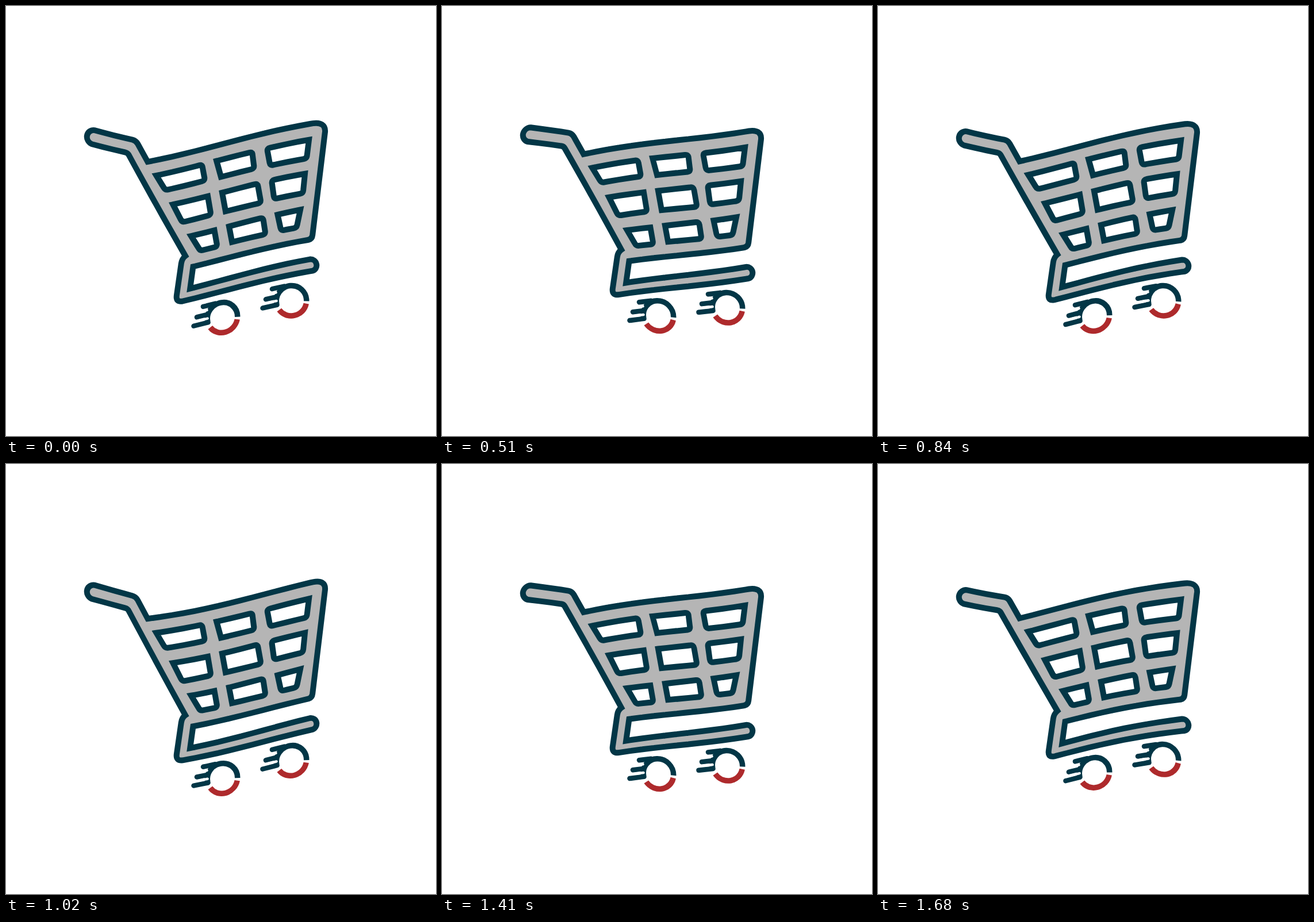
Write an HTML page without scripts that moves like this. It is 748x748 px and loops after 1710 ms.

```html
<!DOCTYPE html>
<html lang="en">
<head>
<meta charset="utf-8">
<title>Waving shopping cart</title>
<style>
  @property --t { syntax: "<number>"; inherits: true; initial-value: 0; }

  html, body { margin: 0; width: 100%; height: 100%; overflow: hidden; background: #fff; }

  .stage {
    position: relative; width: 748px; height: 748px; overflow: hidden;
    animation: tick 1710ms steps(57) -1ms infinite;
  }
  @keyframes tick { from { --t: 0; } to { --t: 57; } }

  .defs { position: absolute; width: 0; height: 0; }

  /* The cart is cut into columns; each follows the wave's height and slope. */
  .strip {
    position: absolute; top: 0; left: calc(128px + var(--i) * 20px);
    width: 20px; height: 748px; overflow: hidden;
  }
  .strip use {
    --a: calc(var(--t) * 12deg - var(--i) * 13.1deg + 67.2deg);
    transform-origin: 0 0;
    transform:
      matrix(1, calc(.0777 * sin(var(--a))), 0, 1, 10, calc(6.8 * cos(var(--a))))
      translateX(calc(-138px - var(--i) * 20px));
  }
</style>
</head>
<body>
<div class="stage">
  <svg class="defs">
    <defs>
      <g id="wheel" fill="none" stroke="#023646" stroke-width="9.5">
        <path d="M402.7 542.6A26.2 26.2 0 1 0 350.9 547.3"/>
        <path stroke="#ae2a2c" d="M402.2 546.9A26.2 26.2 0 0 1 355.3 557.3"/>
        <g stroke-linecap="round">
          <path stroke-width="8.5" d="M343 520.3L364 516.5M332 537.8L350.5 534.5M326.5 552.8L351.5 548.3"/>
          <path stroke="#fff" stroke-width="4.5" d="M340 528.6L349.5 526.9M336 544L350.5 541.5"/>
        </g>
      </g>
      <g id="cart">
        <g stroke="#023646" stroke-width="10">
          <path fill="#b5b5b5" d="M154 212.4L220 226Q226 227.4 229.2 233L246.4 264.2Q390 238 534 210.8
            C547 208.5 556 213 555 225L533.2 405Q532.4 412.5 525 413.8L325.5 449.5L320.2 487.4L529 447.3
            A10.3 10.3 0 0 1 533 467.4L307.5 508.5Q295.5 510.3 296.8 498.5L304.8 443Q306 434.5 312 430.2
            L213.6 252.7Q211.6 249 207.6 248.2L149.5 236.8A12.5 12.5 0 0 1 154 212.4Z"/>
          <g fill="#fff">
            <path d="M261.5 288.2L336 274Q341 273 341.8 277.7L345.2 296.2Q346 301.2 341 302.2L282 313.3Q277 314.2 274.5 309.7Z"/>
            <path d="M366.3 268.5L423 258.4Q428 257.5 428.7 261.5L431.2 281.6Q432 286.6 427 287.6L374 297Z"/>
            <path d="M459 252.1L527 239.5L523.6 267Q523 272 518 272.9L464.5 282.2Q459.5 283 458.6 278L454.9 258Q454 253 459 252.1Z"/>
            <path d="M290.5 339.5L351 328.7L355.7 356.8Q356.5 361.7 351.5 362.7L311.5 370.3Q306.5 371.2 304.1 366.4Z"/>
            <path d="M376 324.5L432.5 314Q437.5 313 438.4 318L442.7 342Q443.5 347 438.5 347.9L382 357.6Z"/>
            <path d="M467 307.9L520 298.5L517.1 327.6Q516.5 332.5 511.5 333.4L471.5 340.6Q466.5 341.5 465.8 336.5L462.7 313.8Q462 308.8 467 307.9Z"/>
            <path d="M322 396L362.5 389L366.7 412.8Q367.5 417.7 362.6 418.5L342.4 421.9Q337.5 422.7 335.2 418Z"/>
            <path d="M388 384.2L442 374Q447 373 447.8 378L450.7 397Q451.5 402 446.5 402.9L393.2 411.8Z"/>
            <path d="M472.5 369L512 361.2L506.5 387.5Q505.5 392.5 500.6 393.3L483.4 396.2Q478.5 397 477.4 392Z"/>
          </g>
        </g>
        <use href="#wheel"/>
        <use href="#wheel" transform="translate(120 -22.5)"/>
      </g>
    </defs>
  </svg>
  <svg class="strip" style="--i:0"><use href="#cart"/></svg>
  <svg class="strip" style="--i:1"><use href="#cart"/></svg>
  <svg class="strip" style="--i:2"><use href="#cart"/></svg>
  <svg class="strip" style="--i:3"><use href="#cart"/></svg>
  <svg class="strip" style="--i:4"><use href="#cart"/></svg>
  <svg class="strip" style="--i:5"><use href="#cart"/></svg>
  <svg class="strip" style="--i:6"><use href="#cart"/></svg>
  <svg class="strip" style="--i:7"><use href="#cart"/></svg>
  <svg class="strip" style="--i:8"><use href="#cart"/></svg>
  <svg class="strip" style="--i:9"><use href="#cart"/></svg>
  <svg class="strip" style="--i:10"><use href="#cart"/></svg>
  <svg class="strip" style="--i:11"><use href="#cart"/></svg>
  <svg class="strip" style="--i:12"><use href="#cart"/></svg>
  <svg class="strip" style="--i:13"><use href="#cart"/></svg>
  <svg class="strip" style="--i:14"><use href="#cart"/></svg>
  <svg class="strip" style="--i:15"><use href="#cart"/></svg>
  <svg class="strip" style="--i:16"><use href="#cart"/></svg>
  <svg class="strip" style="--i:17"><use href="#cart"/></svg>
  <svg class="strip" style="--i:18"><use href="#cart"/></svg>
  <svg class="strip" style="--i:19"><use href="#cart"/></svg>
  <svg class="strip" style="--i:20"><use href="#cart"/></svg>
  <svg class="strip" style="--i:21"><use href="#cart"/></svg>
</div>
</body>
</html>
```
